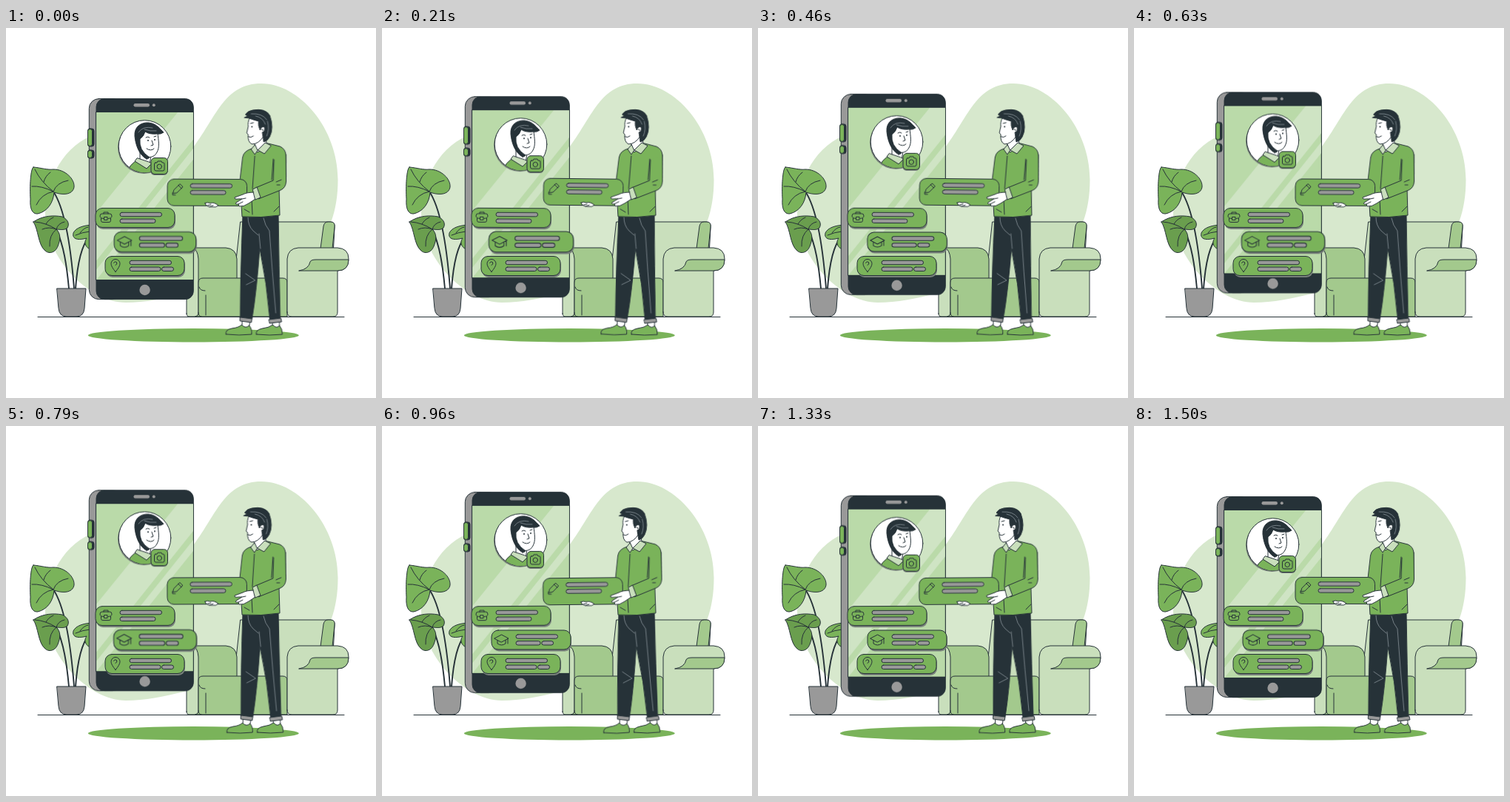
Write an HTML page without scripts that moves like this. It is 500x500 px and loops after 1.54 s.

```html
<!DOCTYPE html>
<html lang="en">
<head>
<meta charset="utf-8">
<title>Building a profile</title>
<style>
  html, body { margin: 0; width: 100%; height: 100%; overflow: hidden; background: #fff; }
  svg { display: block; width: 100%; height: 100%; }
  .ink { stroke: #263238; stroke-width: 1; stroke-linecap: round; stroke-linejoin: round; }
  .line { fill: none; }
  .stem { fill: none; stroke-width: 1.9; }
  .green { fill: #7ab35a; }
  .leaf-dark { fill: #6a9e4e; }
  .mid { fill: #a3c98d; }
  .light { fill: #c9dfbc; }
  .dark { fill: #263238; }
  .gray { fill: #999; }
  .white { fill: #fff; }
  .shade { fill: #77807a; }
  .crease { fill: none; stroke: #89949a; stroke-width: .8; stroke-linecap: round; }

  .phone { animation: bob 1.54s linear infinite; }
  .pulse { transform-origin: 201.5px 289px; animation: pulse 1.54s linear infinite; }
  .sway { animation: sway .77s ease-in-out -.445s infinite alternate; }
  .man { --tilt: .7deg; transform-origin: 345px 250px; }
  .tilting { --tilt: .35deg; transform-origin: 174px 257px; }

  @keyframes bob {
    0%, 100% { transform: translateY(0); }
    13.6% { transform: translateY(-2.8px); }
    29.9% { transform: translateY(-6.2px); }
    40.9% { transform: translateY(-8.6px); }
    46.8% { transform: translateY(-9.3px); }
    51.3% { transform: translateY(-8.8px); }
    62.3% { transform: translateY(-6.2px); }
    78.6% { transform: translateY(-2.8px); }
    93.5% { transform: translateY(0); }
  }
  @keyframes pulse {
    0%, 100% { transform: scale(1.033); }
    10.5% { transform: scale(1.08); }
    29%, 61.7%, 94.2% { transform: scale(1); }
    46% { transform: scale(1.07); }
  }
  @keyframes sway {
    from { transform: rotate(calc(var(--tilt) * -1)); }
    to { transform: rotate(var(--tilt)); }
  }
</style>
</head>
<body>
<svg viewBox="0 0 500 500">
  <defs>
    <clipPath id="portrait"><circle cx="187.5" cy="160" r="35.3"/></clipPath>
    <g id="card">
      <rect class="shade" x="1" y="2" width="107" height="26.5" rx="9"/>
      <rect class="green ink" width="107" height="26" rx="9"/>
      <rect class="gray ink" x="33" y="5.8" width="56.5" height="5.4" rx="2.7"/>
    </g>
  </defs>

  <path fill="#d7e8cd" d="M345 75C396 75 448.500 135 448.500 205C448.500 290 400 330 330 340C260 350 215 371 162 371C112 371 53 310 53 250C53 205 80 155 122 144C170 132 225 190 254 160C285 118 296 75 345 75Z"/>
  <ellipse class="green" cx="253.3" cy="415.3" rx="142.5" ry="9.2"/>
  <path class="ink" d="M43 390.5H457"/>

  <g class="ink">
    <path class="light" d="M317 262H438Q445 262 444 270L440 345H308Z"/>
    <path class="mid" d="M425 298L429 268Q430 262 435 262H439Q445 262 444 269L441 298Z"/>
    <path class="mid" d="M252 297H297Q311 298 312 312V390H252Z"/>
    <path class="light" d="M244 386V309Q245 297 252 297Q259 299 260 312V386Q259 390 255 390H248Q244 390 244 386Z"/>
    <path class="mid" d="M260 385V344Q260 338 266 338H374Q380 338 380 344V390H265Q260 390 260 385Z"/>
    <path class="line" d="M261 350Q262 355 269 355M270 361V388"/>
    <path class="light" d="M380 384V312Q381 298 395 297H448Q463 298 463 312Q463 328 448 328V384Q448 390 442 390H386Q380 390 380 384Z"/>
    <path class="mid" d="M396 328Q409 326 411 316Q412 313 419 313H463Q463 328 448 328Z"/>
  </g>

  <g class="ink">
    <path class="stem" d="M64 221C80 245 88 300 92 352M68 272C78 294 82 320 85 352M112 283C100 296 96 325 94 352"/>
    <path class="green" d="M37 188C48 189 56 192 64 191C80 191 93 204 92 215C90 226 76 226 65 222C64 236 56 248 43 251C35 252 32 243 33 231C32 215 33 190 37 188Z"/>
    <path class="line" d="M39 191Q47 208 64 221M51 208Q53 200 60 195M64 221Q68 209 84 206M35 214Q48 213 64 221M64 221Q48 224 41 239"/>
    <path class="leaf-dark" d="M37 262C50 253 65 253 76 255C84 259 86 265 83 270C79 274 72 272 68 272C74 278 74 285 70 295C66 305 57 305 53 301C43 293 44 272 37 262Z"/>
    <path class="line" d="M39 262Q54 263 68 272M54 265Q57 259 64 256M68 272Q70 264 79 262M49 272Q58 268 68 272M68 272Q58 280 59 295"/>
    <path class="green" d="M120 266C105 266 94 270 91 277C89 286 98 287 109 284C104 291 108 299 120 301Z"/>
    <path class="line" d="M94 280Q103 276 113 275M100 277Q105 270 111 269"/>
    <path class="gray" d="M69 352H108L106 379Q105 390 95 390H82Q72 390 71 379Z"/>
  </g>

  <g class="phone">
    <g class="ink">
      <rect class="gray" x="112.3" y="95.6" width="45" height="271" rx="13"/>
      <rect class="dark" x="110.500" y="136" width="8.500" height="24" rx="3"/>
      <rect class="green" x="110.500" y="136.500" width="6" height="23" rx="2.800"/>
      <rect class="dark" x="110.500" y="165" width="8.500" height="11" rx="3"/>
      <rect class="green" x="110.500" y="165.500" width="6" height="10" rx="2.800"/>
      <rect class="dark" x="122" y="95.6" width="131.3" height="271" rx="11"/>
      <path fill="#badaa9" d="M122 113.5H253.3V340.5H122Z"/>
    </g>
    <path fill="#cfe4c4" d="M232 114H252.8V151L122.5 314V249ZM252.8 163V178L122.5 340V326Z"/>
    <rect class="gray" x="172.5" y="102" width="21.5" height="4.5" rx="2.2"/>
    <circle class="gray" cx="199.8" cy="104.2" r="2"/>
    <circle class="gray" cx="187.6" cy="354" r="7.2"/>

    <circle class="shade" cx="186.5" cy="161.5" r="35.5"/>
    <circle class="white ink" cx="187.5" cy="160" r="35.3"/>
    <g class="ink" clip-path="url(#portrait)">
      <path class="green" d="M163 200Q165 183 180 178L197 184L207 200Z"/>
      <path class="white" d="M181 166V179L194 185L196 172Z"/>
      <path class="light" d="M177 176L174 180L190 190L197 183L193 181Z"/>
      <path class="white" d="M180 150L188 139L205 142C206 152 208 161 204 168C200 176 191 176 186 171Q181 166 180 150Z"/>
      <path class="dark" d="M190 177C180 172 175 158 174 146C173 133 183 127 193 128C203 129 208 136 213 141Q209 144 204 143Q194 144 188 140Q186 147 181 150Q179 165 194 175Q192 177 190 177Z"/>
      <path class="line" d="M189 148Q192 146 194 148M200 147L203 146M197 152L199 158L196 159M190 163Q196 167 200 163"/>
      <path class="crease" d="M179 141Q185 132 198 135M187 137Q195 140 203 139"/>
    </g>
    <circle class="dark" cx="192" cy="152" r="1"/>
    <circle class="dark" cx="201" cy="151" r="1"/>

    <rect class="shade" x="195.5" y="177" width="23" height="22" rx="5"/>
    <g class="green ink">
      <rect x="196" y="175.5" width="22.5" height="22" rx="5"/>
      <path d="M202 182H204L205 180H210L211 182H213Q214 182 214 184V191Q214 193 212 193H203Q200.5 193 200.5 191V184Q200.5 182 202 182Z"/>
      <circle cx="207.3" cy="187.3" r="3.2"/>
    </g>
  </g>

  <g class="sway tilting">
    <g transform="translate(121 243.5)">
      <use href="#card"/>
      <rect class="gray ink" x="33" y="14.6" width="48" height="5.4" rx="2.7"/>
      <path class="line ink" d="M11 14Q6 14 6 10.500Q6 7.500 9 7.500H19Q22 7.500 22 10.500Q22 14 17 14M11 7.500V5.500H17V7.500M12 12H16V16H12ZM7.500 14V17Q7.500 19 10 19H18Q20.500 19 20.500 17V14"/>
    </g>
  </g>
  <g transform="translate(134 308.5)">
    <use href="#card"/>
    <g class="gray ink">
      <rect x="33" y="14.6" width="42" height="5.4" rx="2.7"/>
      <rect x="76.5" y="14.6" width="16" height="5.4" rx="2.7"/>
    </g>
    <path class="line ink" d="M14 21Q8 14 8 10A6 6 0 0 1 20 10Q20 14 14 21ZM11.5 9Q13 6 15.5 8Q17 11 14 12"/>
  </g>
  <g class="pulse">
    <g transform="translate(148 276)">
      <use href="#card"/>
      <g class="gray ink">
        <rect x="33" y="14.6" width="33" height="5.4" rx="2.7"/>
        <rect x="67.8" y="14.6" width="15.8" height="5.4" rx="2.7"/>
      </g>
      <path class="line ink" d="M4 11L13.5 6L23 11L13.5 16ZM8 13.5V18Q13.5 22 19 18V13.5M22 11.5V18"/>
    </g>
  </g>

  <g class="sway man">
    <g class="ink">
      <path class="white" d="M320 396H330L329 407H320ZM361 396H370L370 407H361Z"/>
      <path class="green" d="M298 414Q296 408 306 406Q315 405 319 401Q324 407 329 402Q333 406 332.5 414Q316 416 298 414ZM339 414Q337 408 347 406Q356 405 361 401Q366 407 370 402Q374 406 374 414Q357 416 339 414Z"/>
      <path class="dark" d="M320 253L368 252Q369 320 371 393L357 394Q353 345 343 298Q339 355 333 393L317 392Q317 330 320 253Z"/>
      <path class="gray" d="M317 391L333 393L332 398L317 396ZM356 394L372 392L373 397L357 399Z"/>
    </g>
    <path class="crease" d="M327 256Q327 267 334 274L341 280M324 332L337 341L325 347M348 257Q350 267 356 274Q360 330 365 385M344 298L342 278"/>

    <g class="ink">
      <path class="green" d="M332 163Q321 166 319.5 175L316 206L319 255Q345 257 370 253L369 217L378 207V171Q377 163 370 160L354 156Z"/>
      <path class="line" d="M336 173L333 217M332 231L333 252M361 177L359 205M322 245L329 249M362 248L369 241"/>
      <path class="white" d="M335 150L337 165L340 168L353 158L349 146Z"/>
      <path class="light" d="M336 158L331 164L336 171L340 165L349 170L358 159L350 155L340 165Z"/>
      <path class="white" d="M329 121Q326 128 327 133L325 142L327 144Q326 154 332 157Q341 157 348 146L350 130L342 121Z"/>
      <path class="dark" d="M322 121L326 119L323 117Q326 112 333 111Q350 108 356 118Q362 135 356 147Q353 153 348 154L346 141Q351 140 349 134Q345 132 343 138Q340 132 341 126Q333 124 328 122Z"/>
      <path class="line" d="M330 129L334 128M327 147Q331 149 334 146M345 137Q347 136 347 139"/>
    </g>
    <circle class="dark" cx="332" cy="133.5" r="1"/>
    <path class="crease" d="M331 116Q346 115 352 124M337 119Q347 121 350 130M353 126Q356 137 352 146"/>

    <g class="ink">
      <rect class="green" x="218" y="204.5" width="107.5" height="36" rx="9"/>
      <rect class="gray" x="249" y="210.8" width="56.5" height="5.4" rx="2.7"/>
      <rect class="gray" x="249" y="219.8" width="48" height="5.4" rx="2.7"/>
      <path class="line" d="M227 219L235 211L239 215L231 223L226 224ZM233 213L237 217M225 223V226H229"/>
      <path class="white" d="M269 237Q272 235 276 237Q281 235 287 240Q284 243 278 242Q270 242 269 237Z"/>
      <path class="line" d="M272 240L277 239M275 242L280 240"/>
      <path class="white" d="M336 222Q325 222 320 225L309 229Q308 232 315 231L319 231L311 236Q309 239 314 238L315 241Q321 242 328 237L337 231Z"/>
      <path class="line" d="M319 231L324 230M314 238L320 235"/>
      <path class="green" d="M378 171L378.5 207Q378 216 371 219L341 231L337 216L361 206L362 178"/>
      <path class="light" d="M333.5 218L339 215L344 229L337 232Z"/>
      <path class="line" d="M365 208L372 205M366 212L370 212"/>
    </g>
  </g>
</svg>
</body>
</html>
```
